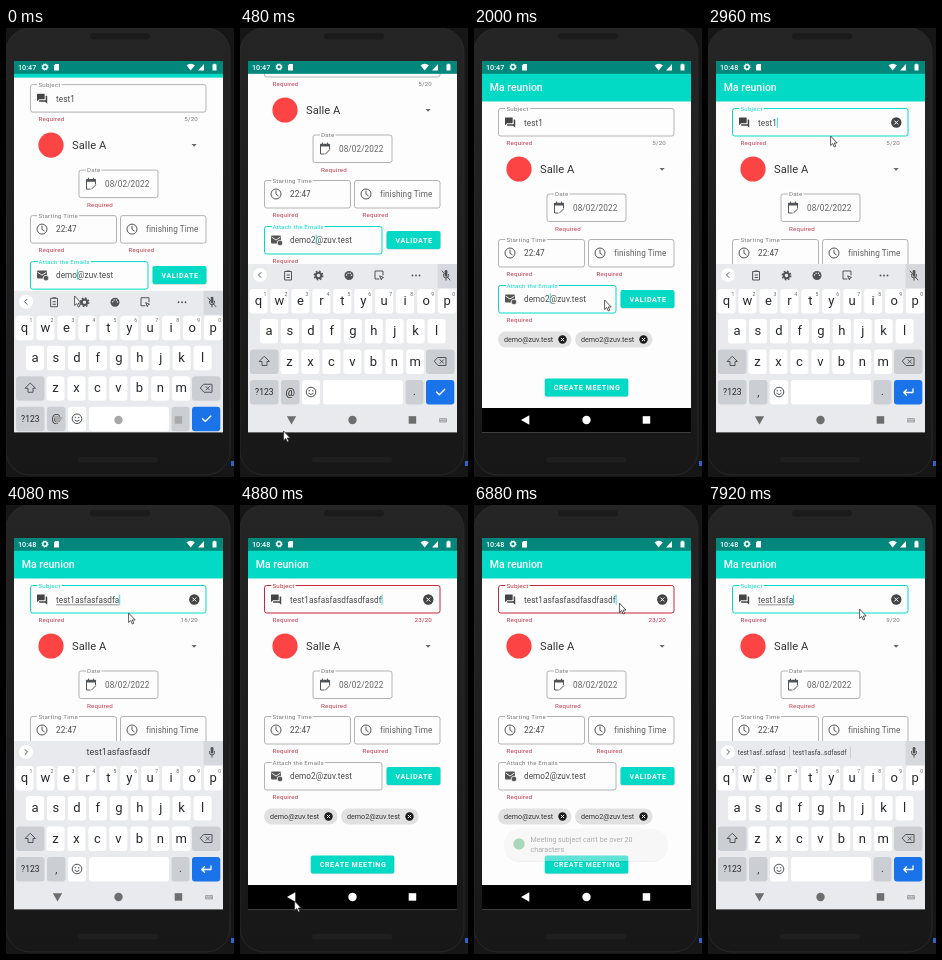
Recreate the animation shown at these times as an HTML page. Size 228x449 px, loop 8000 ms.

```html
<!DOCTYPE html>
<html lang="en">
<head>
<meta charset="utf-8">
<style>
html, body { margin: 0; width: 100%; height: 100%; overflow: hidden; background: #161617; }
svg { display: block; width: 228px; height: 449px; font-family: Roboto, Arial, sans-serif; }
.value { font-size: 8.2px; letter-spacing: .009em; fill: #484848; }
.soft { fill: #606060; }
.label { font-size: 6.2px; letter-spacing: .03em; fill: #777; stroke: #fff; stroke-width: 3px; paint-order: stroke; }
.note { font-size: 6.2px; letter-spacing: .03em; fill: #c4374a; }
.box { fill: none; stroke: #929292; stroke-width: .7; }
.btn { font-size: 7.15px; font-weight: 700; letter-spacing: .08em; fill: #fff; text-anchor: middle; }
.chip { font-size: 7.15px; fill: #333; }
.key { font-size: 13px; fill: #25272a; text-anchor: middle; }
.small { font-size: 8.5px; }
.mark { font-size: 10.5px; }
.digit { font-size: 5px; fill: #5f6368; text-anchor: middle; }
.line { fill: none; stroke: #505458; stroke-width: 1; stroke-linecap: round; stroke-linejoin: round; }
.bright { stroke: #fff; stroke-width: 1.3; }
.divider { stroke: #b8bcc0; stroke-width: .6; }
.hint { font-size: 9px; fill: #3c4043; text-anchor: middle; }
.pair { font-size: 6.6px; }
</style>
</head>
<body>
<svg id="stage" viewBox="0 0 228 449"></svg>
<script>
const LOOP = 8000;
const TEAL = '#03dac5', RED = '#c4283c', GREY = '#929292';
const SUBJECT = 'test1asfasfasdfasdfasdf';
const MAIL = ['demo', '@zuv.test'];

const rect = (x, y, w, h, fill, r = 0, extra = '') =>
  `<rect x="${x}" y="${y}" width="${w}" height="${h}" rx="${r}" fill="${fill}" ${extra}/>`;
const circle = (x, y, r, fill, extra = '') => `<circle cx="${x}" cy="${y}" r="${r}" fill="${fill}" ${extra}/>`;
const text = (x, y, cls, s, extra = '') => `<text x="${x}" y="${y}" class="${cls}" ${extra}>${s}</text>`;
const line = (d, cls = '', extra = '') => `<path class="line ${cls}" d="${d}" ${extra}/>`;
const group = (id, body, extra = '') => `<g id="${id}" ${extra}>${body}</g>`;

const field = (id, x, y, w, label) =>
  rect(x, y, w, 27.5, 'none', 2.2, `class="box" id="${id}Box"`) +
  (label ? text(x + 8, y + 2.2, 'label', label, `id="${id}Label"`) : '');
const button = (x, y, w, s) =>
  rect(x, y + .8, w, 18, '#0002', 2) + rect(x, y, w, 18, TEAL, 2) + text(x + w / 2 + .5, y + 11.7, 'btn', s);
const cancel = (x, y, r, fill) => {
  const k = r * .38;
  return circle(x, y, r, fill) +
    `<path d="M${x - k} ${y - k}l${2 * k} ${2 * k}m0 ${-2 * k}l${-2 * k} ${2 * k}" stroke="#fff"/>`;
};
const chip = (x, w, s) =>
  rect(x, 303.5, w, 16, '#e1e1e1', 8) + text(x + 6, 314.2, 'chip', s) + cancel(x + w - 9, 311.5, 4.2, '#1c1c1c');
const clock = x => circle(x, 225, 5, 'none', 'stroke="#555"') + line(`M${x} 222v3.3l2.2 1.4`);

const forum = '<path transform="translate(30 88.5) scale(.51)" fill="#444" d="M21 6h-2v9H6v2c0 .6.4 1 1 1h11l4 4V7c0-.6-.4-1-1-1zm-4 6V3c0-.6-.4-1-1-1H3c-.6 0-1 .4-1 1v14l4-4h10c.6 0 1-.4 1-1z"/>';
const calendar = rect(80, 174.8, 10, 2.8, '#505458', .8) + line('M89.5 177v3M80.5 177v8h3.5M82.5 174v1m5-1v1M85.5 185l4-4');
const envelope = rect(31, 266.5, 10, 8, '#555', 1) +
  '<path d="M31.5 268l4.500 3l4.500-3" fill="none" stroke="#fff" stroke-width=".9"/>' +
  circle(40, 274, 2.8, '#555', 'stroke="#fff" stroke-width=".8"');

const page = rect(8, 45, 209, 420, '#fefdfe') + rect(8, 45, 209, 28.5, TEAL) +
  text(15.8, 63.2, '', 'Ma reunion', 'font-size="10.5" font-weight="500" fill="#fff"') +
  field('subject', 24.5, 80.5, 175.5, 'Subject') + forum +
  text(50, 97.8, 'value', '', 'id="subjectText"') +
  rect(50, 99.6, 10, .6, '#444', 0, 'id="underline"') +
  group('clear', cancel(188.3, 94.5, 5.2, '#444')) +
  text(32.5, 117.2, 'note', 'Required') +
  text(192, 117.2, 'note', '', 'id="count" text-anchor="end"') +
  circle(45, 141, 12.6, '#fd4444') +
  text(66, 145, '', 'Salle A', 'font-size="11.2" fill="#333"') +
  '<path d="M185.500 140h5.200l-2.600 2.700z" fill="#666"/>' +
  field('date', 73, 166, 79, 'Date') + calendar +
  text(99, 183, 'value soft', '08/02/2022') + text(81, 202.5, 'note', 'Required') +
  field('start', 24.5, 211.5, 86, 'Starting Time') + clock(36) + text(50, 228.2, 'value', '22:47') +
  field('end', 114.5, 211.5, 85.5) + clock(126) + text(140, 228.2, 'value soft', 'finishing Time') +
  text(32.5, 248, 'note', 'Required') + text(122.5, 248, 'note', 'Required') +
  field('mail', 24.5, 257.5, 117.5, 'Attach the Emails') + envelope +
  text(50, 274, 'value', '', 'id="mailText"') + text(32.5, 294, 'note', 'Required') +
  button(146.5, 262, 54, 'VALIDATE') +
  chip(24, 73.5, MAIL.join('')) + group('chip2', chip(101, 77.5, MAIL.join('2'))) +
  button(70.8, 350.5, 83.5, 'CREATE MEETING') +
  rect(0, 0, .8, 10, TEAL, 0, 'id="caret"');

const keyRow = (letters, x, y) => [...letters].map((c, i) => {
  const cx = x + i * 20.95;
  return rect(cx - 9, y - 12, 18, 24.5, '#fff', 3) + text(cx, y + 4.2, 'key', c) +
    (y < 280 ? text(cx + 6.5, y - 5.5, 'digit', (i + 1) % 10) : '');
}).join('');
const darkKey = (x, w, y) => rect(x, y - 12, w, 24.5, '#cbcfd4', 3);

const mic = rect(197.5, 236, 20, 24, '#d5d8dc') +
  line('M203.5 246.5v1a2.5 2.5 0 0 0 5 0v-1m-2.5 3.7v2') + rect(204.7, 242, 2.7, 6.5, '#505458', 1.3);
const tools = line('M21 244.5l-2.5 2.5l2.5 2.5') +
  line('M45 243.5h6.5v8.5h-6.5zM47 243h2.5M47 247h2.5M47 249.5h2.5') +
  circle(78.5, 247.5, 2.7, 'none', 'stroke="#505458" stroke-width="2"') +
  circle(78.5, 247.5, 4.3, 'none', 'stroke="#505458" stroke-width="1.3" stroke-dasharray="1.7 1.677"') +
  circle(109, 247.5, 4.5, '#505458') +
  [[-2.4, -.5], [-.9, -2.3], [1.4, -2.2], [2.5, -.2]].map(([x, y]) => circle(109 + x, 247.5 + y, .7, '#e8eaed')).join('') +
  line('M143 247v-4h-8v8h4M140 248l3.5 1.5l-1.5.5l-.5 1.5z') +
  [172.5, 176, 179.5].map(x => circle(x, 247.5, .9, '#505458')).join('') + line('M202 243l8 9');
const hints = line('M19 244.5l2.5 2.5l-2.5 2.5') +
  text(112.3, 250.4, 'hint', '', 'id="hint"') +
  group('pair', text(53.7, 249.8, 'hint pair', 'test1asf..sdfasd') +
    text(111.7, 249.8, 'hint pair', 'test1asfa..sdfasdf') + line('M81.5 242v11M142.5 242v11', 'divider'));

const keyboard = rect(8, 236, 209, 340, '#e8eaed') + circle(20, 247, 7, '#fff') + mic +
  group('tools', tools) + group('hints', hints) +
  keyRow('qwertyuiop', 18.5, 273) + keyRow('asdfghjkl', 29, 303) + keyRow('zxcvbnm', 49.5, 333.5) +
  darkKey(10, 28.5, 333.5) + line('M24.5 328.5l5 5h-2.5v4h-5v-4h-2.5z') +
  darkKey(186, 28.5, 333.5) + line('M198 329.5h8v8h-8l-3.5-4zM200 331.8l3.5 3.5m0-3.5l-3.5 3.5') +
  darkKey(10, 28.5, 364) + text(24.3, 367, 'key small', '?123') +
  darkKey(41, 18.5, 364) + text(50.3, 367.5, 'key mark', ',', 'id="comma"') +
  rect(62, 352, 18, 24.5, '#fff', 3) + circle(71, 364, 4.8, 'none', 'stroke="#505458"') +
  circle(69.3, 362.8, .7, '#505458') + circle(72.7, 362.8, .7, '#505458') + line('M68.8 365.5q2.2 2.4 4.4 0') +
  rect(83, 352, 80, 24.5, '#fff', 3) +
  darkKey(165.5, 18, 364) + text(174.5, 367, 'key mark', '.') +
  rect(186, 352, 28.3, 24.5, '#1a73e8', 3) +
  line('M196.500 364l2.800 2.800l5.500-5.500', 'bright', 'id="tick"') +
  line('M205 361v3.500h-9m2.500-2.700l-2.700 2.700l2.700 2.700', 'bright', 'id="enter"');

const nav = group('nav', '<path id="back" d="M47 392l8.300-4.700v9.400z"/><circle cx="112.500" cy="392" r="4.200"/>' +
    '<rect x="168.700" y="388.200" width="7.500" height="7.500"/>') +
  group('switcher', rect(199, 390, 8, 4.5, '#a4a7ab', .8) +
    '<path d="M200 391.5h6M201 393.200h4" stroke="#e8eaed" stroke-width=".7" stroke-dasharray="1 .6"/>');

const toast = rect(30, 324.5, 164, 32.5, '#0002', 16) + rect(30, 323.5, 164, 32.5, '#efeff0', 16) +
  circle(45, 339, 5.7, '#2aa052') +
  text(56.5, 337, 'chip', "Meeting subject can't be over 20") + text(56.5, 347, 'chip', 'characters');

const status = rect(8, 33, 209, 12.8, '#01877c') +
  text(12, 41.8, '', '', 'id="time" font-size="7.2" font-weight="500" fill="#fff"') +
  circle(39, 39, 2.2, 'none', 'stroke="#fff" stroke-width="1.5"') +
  circle(39, 39, 3.2, 'none', 'stroke="#fff" stroke-width=".8" stroke-dasharray="1.2 1.313"') +
  '<path d="M49.500 36h3.500v6.500h-5v-5z" fill="#fff"/>' +
  '<path d="M180.500 37.200q4.200-3 8.400 0l-4.200 5.300zM192 42.500h6v-6.500zM206.500 36.500h1v-.8h2v.8h1v6h-4z" fill="#fff"/>';

const shell = '<linearGradient id="metal" x2="0" y2="1"><stop stop-color="#262526"/><stop offset="1" stop-color="#181718"/></linearGradient>' +
  rect(0, 0, 224, 447, 'url(#metal)', 24, 'stroke="#2e2d2e" stroke-width=".8"') +
  rect(84, 5, 60, 6.5, '#1c1b1c', 3.2) + rect(72, 429, 80, 5.5, '#201f20', 2.7) +
  rect(225, 433, 3, 5, '#2c64cf');

const stage = document.getElementById('stage');
stage.innerHTML = '<clipPath id="screen"><rect x="8" y="33" width="209" height="371.200"/></clipPath>' + shell +
  group('view', group('page', page) + rect(8, 380, 209, 25, '#000') + group('toast', toast) +
    group('keys', keyboard) + nav + status, 'clip-path="url(#screen)"') +
  group('mouse', '<path d="M.6 0V9.500L2.800 7.500L4.300 11L5.800 10.300L4.300 7H7.200Z" fill="#fff" stroke="#333" stroke-width=".8"/>');

const ui = {};
stage.querySelectorAll('[id]').forEach(e => ui[e.id] = e);
const show = (e, on) => e.setAttribute('visibility', on ? 'inherit' : 'hidden');
const move = (e, x, y) => e.setAttribute('transform', `translate(${x} ${y})`);
const write = (e, s) => { if (e.textContent !== s) e.textContent = s; };

const smooth = p => p * p * (3 - 2 * p);
function track(keys, t, col = 1, ease = p => p) {
  if (t <= keys[0][0]) return keys[0][col];
  for (let i = 1; i < keys.length; i++) {
    const a = keys[i - 1], b = keys[i];
    if (t < b[0]) return a[col] + (b[col] - a[col]) * ease((t - a[0]) / (b[0] - a[0]));
  }
  return keys[keys.length - 1][col];
}

// Each row is a time in ms followed by the values reached then.
const MOUSE = [[0, 68, 268], [80, 68, 272], [480, 43, 403], [600, 50, 391], [680, 50, 391], [900, 110, 345],
  [1200, 172, 270], [1360, 172, 270], [1820, 130, 272], [2020, 130, 272], [2360, 118, 98], [2560, 118, 98],
  [2800, 122, 108], [4120, 122, 108], [4560, 52, 394], [4720, 52, 394], [4880, 54, 396], [5000, 54, 396],
  [5480, 113, 358], [5680, 112, 358], [5920, 101, 347], [6400, 104, 350], [6900, 145, 97], [7060, 145, 97],
  [7600, 151, 102], [7920, 151, 104]];
const SLIDE = [[0, 27], [80, 8], [160, 0], [620, 0], [800, 169], [2560, 169], [2720, 60], [2960, 0],
  [4680, 0], [4860, 169], [7020, 169], [7160, 60], [7360, 0]];
const PAN = [[0, -23.6], [80, -46], [160, -59], [620, -59], [820, 0]];
const TYPED = [[3060, 5], [4090, 16.3], [4450, 23], [7440, 23], [7520, 22], [7920, 9]];
const TOAST = [[5660, 0], [5860, 1], [6760, 1], [6960, 0]];

function focus(id, on, color) {
  ui[id + 'Box'].style.stroke = on ? color : GREY;
  ui[id + 'Box'].style.strokeWidth = on ? 1 : .7;
  ui[id + 'Label'].style.fill = on ? color : '#777';
}

function draw(t) {
  const slide = track(SLIDE, t), open = 1 - slide / 169;
  const n = Math.floor(track(TYPED, t) + 1e-6);
  const onSubject = t >= 2450, error = n > 20;

  move(ui.page, 0, track(PAN, t));
  move(ui.keys, 0, slide);
  show(ui.keys, slide < 169);
  move(ui.mouse, track(MOUSE, t, 1, smooth), track(MOUSE, t, 2, smooth));
  ui.toast.setAttribute('opacity', track(TOAST, t));
  write(ui.time, t < 2400 ? '10:47' : '10:48');

  write(ui.subjectText, SUBJECT.slice(0, n));
  write(ui.count, n + '/20');
  ui.count.style.fill = error ? RED : '#777';
  focus('subject', onSubject, error ? RED : TEAL);
  focus('mail', !onSubject, TEAL);
  show(ui.clear, onSubject);
  write(ui.mailText, MAIL.join(t < 240 ? '' : '2'));
  show(ui.chip2, t >= 1280);

  const width = ui.subjectText.getComputedTextLength();
  ui.underline.setAttribute('width', width);
  show(ui.underline, (t > 3060 && t < 4680) || t > 7440);
  const mailWidth = ui.mailText.getSubStringLength(0, t < 240 ? 4 : 5);
  ui.caret.setAttribute('x', 50 + (onSubject ? width : mailWidth));
  ui.caret.setAttribute('y', onSubject ? 89.5 : 265.5);
  const typing = t < 850 || (t > 3060 && t < 4850) || t > 7440;
  show(ui.caret, typing || (t + 150) % 1000 < 500);

  const pair = t > 7380, hinting = (t > 3100 && t < 6000) || pair;
  show(ui.tools, !hinting);
  show(ui.hints, hinting);
  show(ui.pair, pair);
  write(ui.hint, pair ? '' : SUBJECT.slice(0, Math.max(5, n - 1)));
  write(ui.comma, onSubject ? ',' : '@');
  show(ui.tick, !onSubject);
  show(ui.enter, onSubject);

  const shade = Math.round(255 - 145 * open ** 3);
  ui.nav.setAttribute('fill', `rgb(${shade},${shade},${shade})`);
  ui.back.setAttribute('transform', `rotate(${-90 * open} 51.5 392)`);
  show(ui.switcher, open === 1);
}

function tick() {
  draw(performance.now() % LOOP);
  requestAnimationFrame(tick);
}
tick();
</script>
</body>
</html>
```
